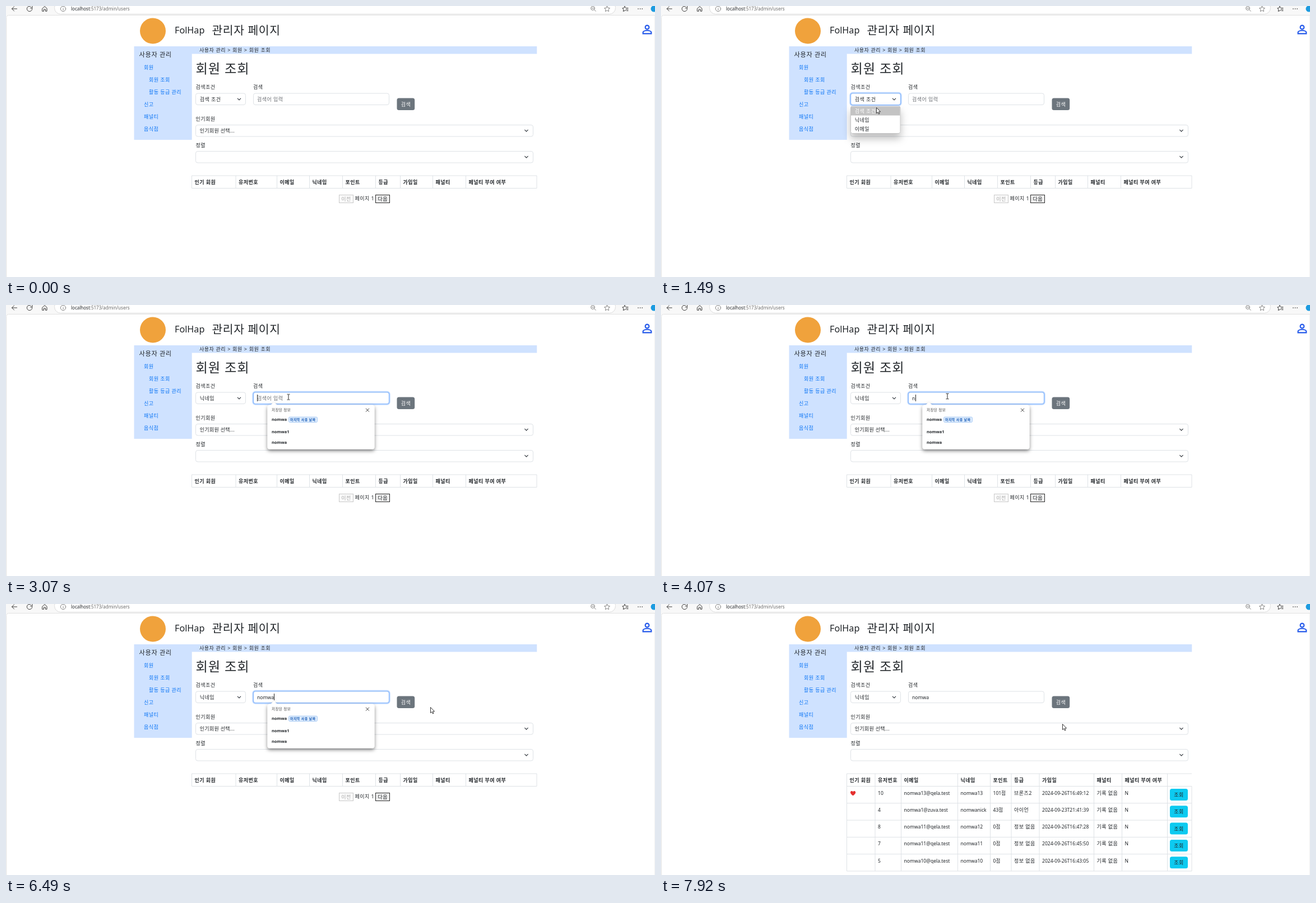
Recreate the animation shown at these times as an HTML page. Size 1158 px wide and 484 px high, loop 7.99 s.

```html
<!DOCTYPE html>
<html lang="ko">
<head>
<meta charset="utf-8">
<title>관리자 페이지</title>
<style>
html, body { margin: 0; width: 100%; height: 100%; overflow: hidden; background: #fff; }
svg { display: block; width: 1158px; height: 484px; }
text { font: 9px "Noto Sans", "Noto Sans CJK KR", "Noto Sans CJK JP", sans-serif; letter-spacing: .45px; fill: #212529; white-space: pre; }
.latin { font-size: 8.55px; letter-spacing: 0; }
.bold text, .bold { font-weight: 700; }
.links text { fill: #0a74f5; }
.url { font-size: 8px; letter-spacing: 0; }
.icon { fill: none; stroke: #3b3b3b; stroke-width: 1; stroke-linecap: round; stroke-linejoin: round; }
.field { fill: #fff; stroke: #dee2e6; }
.chev { fill: none; stroke: #343a40; stroke-width: 1.2; stroke-linecap: round; stroke-linejoin: round; }
.grid { fill: none; stroke: #dee2e6; }
.focus rect { fill: none; stroke: #86b7fe; stroke-width: 1.2; }
.focus .halo { stroke: #bcd7fe; stroke-width: 2; }
.hint { font-size: 6.6px; letter-spacing: .35px; fill: #4a4a4a; }
.badge { font-size: 6px; letter-spacing: .4px; font-weight: 700; fill: #1c5fb8; }
.saved { font-size: 7.3px; letter-spacing: 0; font-weight: 700; }
.pointer { fill: #fff; stroke: #222; stroke-width: .9; stroke-linejoin: round; }

.a { animation: 7990ms step-end infinite; }
#pointer { animation-name: move; }
#arrow { animation-name: arrow; }
#beam { animation-name: beam; }
#hand { animation-name: hand; }
#selFocus { animation-name: selFocus; }
#menu { animation-name: menu; }
#mark { animation-name: mark; }
#opt1 { animation-name: opt1; }
#opt2 { animation-name: opt2; }
#before { animation-name: before; }
#after { animation-name: after; }
#inFocus { animation-name: inFocus; }
#popup { animation-name: popup; }
#prompt { animation-name: prompt; }
#typed { animation-name: type; }
#caret { animation-name: caret; }
#blink { animation-name: blink; }
#btn { animation-name: btn; }
#empty { animation-name: empty; }
#result { animation-name: result; }

@keyframes move {
  0% { transform: translate(1065px, 500px); }
  1.6% { transform: translate(1065px, 471px); animation-timing-function: steps(3); }
  4.2% { transform: translate(790px, 365px); animation-timing-function: steps(3); }
  6.7% { transform: translate(540px, 255px); animation-timing-function: steps(4); }
  10.2% { transform: translate(349px, 165px); }
  11.85% { transform: translate(352px, 164px); animation-timing-function: steps(3); }
  14.5% { transform: translate(360px, 161px); }
  17% { transform: translate(366px, 164px); animation-timing-function: steps(2); }
  18.6% { transform: translate(384px, 181px); animation-timing-function: steps(4); }
  22.1% { transform: translate(380px, 203px); }
  24% { transform: translate(380px, 204px); animation-timing-function: steps(4); }
  28.7% { transform: translate(377px, 210px); }
  31.4% { transform: translate(383px, 208px); animation-timing-function: steps(7); }
  36.9% { transform: translate(490px, 167px); animation-timing-function: steps(3); }
  39.2% { transform: translate(511px, 163px); }
  71.7% { transform: translate(568px, 161px); animation-timing-function: steps(2); }
  73.4% { transform: translate(670px, 159px); animation-timing-function: steps(2); }
  75.2% { transform: translate(735px, 124px); animation-timing-function: steps(3); }
  77.8% { transform: translate(760px, 184px); }
  81.2% { transform: translate(757px, 184px); animation-timing-function: steps(4); }
  84.7% { transform: translate(725px, 181px); animation-timing-function: steps(4); }
  88.1% { transform: translate(720px, 185px); }
  92.2% { transform: translate(719px, 186px); }
  94% { transform: translate(720px, 187px); }
  96.4% { transform: translate(720px, 191px); animation-timing-function: steps(3); }
  99.1%, 100% { transform: translate(716px, 214px); }
}
@keyframes arrow { 0% { opacity: 1 } 35.7% { opacity: 0 } 74.5% { opacity: 1 } 84.7% { opacity: 0 } 97.3%, 100% { opacity: 1 } }
@keyframes beam { 0% { opacity: 0 } 35.7% { opacity: 1 } 74.5%, 100% { opacity: 0 } }
@keyframes hand { 0% { opacity: 0 } 84.7% { opacity: 1 } 97.3%, 100% { opacity: 0 } }
@keyframes selFocus { 0% { opacity: 0 } 17% { opacity: 1 } 36.9%, 100% { opacity: 0 } }
@keyframes menu { 0% { opacity: 0 } 17% { opacity: 1 } 24%, 100% { opacity: 0 } }
@keyframes mark { 0% { transform: none } 20.3%, 100% { transform: translateY(15.8px) } }
@keyframes opt1 { 0% { fill: #fff } 20.3%, 100% { fill: #212529 } }
@keyframes opt2 { 0% { fill: #212529 } 20.3%, 100% { fill: #fff } }
@keyframes before { 0% { opacity: 1 } 24%, 100% { opacity: 0 } }
@keyframes after { 0% { opacity: 0 } 24%, 100% { opacity: 1 } }
@keyframes inFocus { 0% { opacity: 0 } 36.9% { opacity: 1 } 82%, 100% { opacity: 0 } }
@keyframes popup { 0% { opacity: 0 } 37.8% { opacity: 1 } 82%, 100% { opacity: 0 } }
@keyframes prompt { 0% { opacity: 1 } 50.9%, 100% { opacity: 0 } }
@keyframes type {
  0% { width: 0 } 50.9% { width: 5.4px } 51.8% { width: 10.5px }
  56.8% { width: 18.4px } 58.4% { width: 25.2px } 62.5%, 100% { width: 40px }
}
@keyframes caret {
  0% { transform: none } 50.9% { transform: translateX(5.5px) } 51.8% { transform: translateX(10.5px) }
  56.8% { transform: translateX(18.5px) } 58.4% { transform: translateX(25.3px) } 62.5%, 100% { transform: translateX(30px) }
}
@keyframes blink { 0% { opacity: 0 } 36.9% { opacity: 1 } 44.3% { opacity: 0 } 50.9% { opacity: 1 } 69.2% { opacity: 0 } 75.5% { opacity: 1 } 82%, 100% { opacity: 0 } }
@keyframes btn { 0% { fill: #6c757d } 84.7% { fill: #5c636a } 97.3%, 100% { fill: #6c757d } }
@keyframes empty { 0% { opacity: 1 } 92.2%, 100% { opacity: 0 } }
@keyframes result { 0% { opacity: 0 } 92.2%, 100% { opacity: 1 } }
</style>
</head>
<body>
<svg viewBox="0 0 1158 484">
  <defs>
    <path id="chev" class="chev" d="M-2.7-1.4 0 1.4 2.7-1.4"/>
    <clipPath id="typedClip"><rect id="typed" class="a" x="448" y="156" width="0" height="20"/></clipPath>
    <filter id="deep" x="-40%" y="-40%" width="180%" height="210%"><feDropShadow dx="0" dy="9" stdDeviation="7" flood-opacity=".25"/></filter>
    <filter id="soft" x="-10%" y="-20%" width="120%" height="140%"><feDropShadow dx="0" dy="3" stdDeviation="3" flood-opacity=".5"/></filter>
  </defs>

  <!-- browser bar -->
  <rect width="1158" height="17" fill="#f8f8f8"/>
  <rect x="86.5" y="-8.5" width="1001" height="23" rx="11" fill="#fff" stroke="#dcdcdc"/>
  <path d="M.5 484V20.5Q.5 16.5 4.5 16.5H1158V484" fill="#fff" stroke="#e2e2e2"/>
  <g class="icon">
    <path d="M10.5 5H19.5M14.5 1 10.5 5 14.5 9"/>
    <path d="M46.5 3.5A4.7 4.7 0 1 1 44 .7M46.8 0V3.5H43.3"/>
    <path d="M65 4.3 69 .8 73 4.3V9.3H70.5V6H67.5V9.3H65Z"/>
    <g stroke="#777" stroke-width=".9"><circle cx="102" cy="5" r="4.6"/><path d="M102 4.7V7.4M102 2.8V2.9"/>
      <circle cx="1047" cy="4" r="3.4"/><path d="M1049.5 6.5 1052.3 9.3M1045.4 4H1048.6"/>
      <path d="M1072.5.2 1074 3.4 1077.5 3.8 1074.9 6.2 1075.6 9.7 1072.5 8 1069.4 9.7 1070.1 6.2 1067.5 3.8 1071 3.4Z"/></g>
    <path d="M1106 7.5 1101.3 9.5 1102 6.2 1099.7 4 1102.7 3.5 1104 .5 1105.4 3.3M1106.5 3.7H1110M1106.5 6H1110M1107.5 8.4H1110"/>
    <path stroke-width="1.7" d="M1128 5h.01M1131.6 5h.01M1135.2 5h.01"/>
  </g>
  <circle cx="1156" cy="5" r="5.5" fill="#1c9be0"/>
  <text class="url" x="116" y="8">localhost<tspan fill="#6a6a6a">:5173/admin/users</tspan></text>

  <!-- header -->
  <circle cx="262" cy="44.5" r="23" fill="#f0a23c"/>
  <text x="301" y="49.3" style="font-size:16.2px;letter-spacing:0">FolHap</text>
  <text x="367.5" y="50.7" style="font-size:20.4px;letter-spacing:.6px;font-weight:300">관리자 페이지</text>
  <g fill="none" stroke="#2459ea" stroke-width="2.1"><circle cx="1144" cy="38" r="3.4"/><path d="M1136.6 49.4V47.4C1136.6 44.8 1141 43.8 1144 43.8S1151.4 44.8 1151.4 47.4V49.4Z"/></g>

  <!-- sidebar and breadcrumb -->
  <path d="M228.5 72H947.3V85.6H331.7V239H228.5Z" fill="#cfe2ff"/>
  <text x="237.5" y="91.3" style="font-size:11.2px;letter-spacing:.65px">사용자 관리</text>
  <g class="links">
    <text x="246" y="113.3">회원</text>
    <text x="255" y="135.3">회원 조회</text>
    <text x="255" y="157.3">활동 등급 관리</text>
    <text x="246" y="179.3">신고</text>
    <text x="246" y="201.3">패널티</text>
    <text x="246" y="223.3">음식점</text>
  </g>
  <text x="345" y="82.3" style="word-spacing:.5px">사용자 관리 &gt; 회원 &gt; 회원 조회</text>
  <text x="338.5" y="120.3" style="font-size:23.2px;letter-spacing:.9px;font-weight:300">회원 조회</text>

  <!-- search form -->
  <text x="338.5" y="148.3">검색조건</text>
  <text x="441" y="148.3">검색</text>
  <text x="338.5" y="204.8">인기회원</text>
  <text x="338.5" y="252.3">정렬</text>
  <g class="field">
    <rect x="338.5" y="156" width="89" height="20.5" rx="3.5"/>
    <rect x="441.5" y="156" width="242" height="20.5" rx="3.5"/>
    <rect x="338.5" y="212.5" width="602" height="20.5" rx="3.5"/>
    <rect x="338.5" y="259.5" width="602" height="20.5" rx="3.5"/>
  </g>
  <use href="#chev" x="416" y="166.5"/>
  <use href="#chev" x="928.5" y="222.7"/>
  <use href="#chev" x="928.5" y="269.7"/>
  <text x="345.7" y="226" style="letter-spacing:.3px">인기회원 선택...</text>
  <text id="before" class="a" x="345.7" y="169.8">검색 조건</text>
  <text id="after" class="a" x="345.7" y="169.8" opacity="0">닉네임</text>
  <text id="prompt" class="a" x="448" y="169.8" style="fill:#6b6f74">검색어 입력</text>
  <rect id="btn" class="a" x="697.5" y="164.5" width="31.7" height="21.5" rx="3.5" fill="#6c757d"/>
  <text x="704.7" y="178.7" style="fill:#fff">검색</text>

  <!-- tables -->
  <g id="empty" class="a">
    <g class="bold" id="emptyHead"></g>
    <rect x="594.5" y="337.5" width="25" height="14" fill="#fafafa" stroke="#c9c9c9"/>
    <text x="598.3" y="348" style="fill:#ababab">이전</text>
    <text x="622.5" y="347.3">페이지 1</text>
    <rect x="659.5" y="337.5" width="25" height="14" fill="#efefef" stroke="#2a2a2a"/>
    <text x="663.5" y="348">다음</text>
  </g>
  <g id="result" class="a" opacity="0"></g>

  <!-- focus, menu, suggestions -->
  <g id="selFocus" class="a focus" opacity="0">
    <rect class="halo" x="337.3" y="154.8" width="91.4" height="22.9" rx="4.7"/>
    <rect x="338.5" y="156" width="89" height="20.5" rx="3.5"/>
  </g>
  <g id="menu" class="a" opacity="0">
    <rect x="338.5" y="179" width="88.5" height="48.5" rx="3" fill="#fff" stroke="#c4c4c4" filter="url(#deep)"/>
    <rect id="mark" class="a" x="339" y="179.7" width="87.5" height="15.8" fill="#c3c3c3"/>
    <text id="opt1" class="a" x="345.7" y="191">검색 조건</text>
    <text id="opt2" class="a" x="345.7" y="206.8">닉네임</text>
    <text x="345.7" y="222.6">이메일</text>
  </g>
  <g id="inFocus" class="a focus" opacity="0">
    <rect class="halo" x="440.3" y="154.8" width="244.4" height="22.9" rx="4.7"/>
    <rect x="441.5" y="156" width="242" height="20.5" rx="3.5"/>
  </g>
  <text class="latin" x="448" y="169.8" clip-path="url(#typedClip)">nomwa</text>
  <g id="blink" class="a" opacity="0"><path id="caret" class="a" d="M448.5 160V172" stroke="#222"/></g>
  <g id="popup" class="a" opacity="0">
    <path d="M471 178.5H472L478 174 484 178.5H653Q657.5 178.5 657.5 183V253Q657.5 257.5 653 257.5H471Q466.5 257.5 466.5 253V183Q466.5 178.5 471 178.5Z" fill="#fff" filter="url(#soft)"/>
    <text class="hint" x="474" y="190.4">저장된 정보</text>
    <path class="icon" d="M642.3 185 647.7 190.4M647.7 185 642.3 190.4"/>
    <text class="saved" x="474" y="207.3">nomwa</text>
    <rect x="504.5" y="200" width="51" height="9.5" rx="2" fill="#dcebfd" stroke="#9cc3f2" stroke-width=".8"/>
    <text class="badge" x="507" y="207">마지막 사용 날짜</text>
    <text class="saved" x="474" y="228.7">nomwa1</text>
    <text class="saved" x="474" y="248.2">nomwa</text>
  </g>

  <!-- pointer -->
  <g id="pointer" class="a">
    <path id="arrow" class="a pointer" d="M.5.5V10.6L2.8 8.5 4.4 12 6 11.3 4.5 7.9H7.6Z"/>
    <path id="beam" class="a" opacity="0" d="M-2.5-4.8H-.7L0-4.3.7-4.8H2.5M0-4.3V4.3M-2.5 4.8H-.7L0 4.3.7 4.8H2.5" fill="none" stroke="#222"/>
    <path id="hand" class="a pointer" opacity="0" d="M-1.1 8.5V.8Q-1.1-.4 0-.4T1.1.8V4.6Q2.4 4.3 3.1 4.9 4 4.6 4.7 5.1 6.6 5.2 6.8 6.6V9.5L5.4 13.3H0L-3.8 8.6Q-4.3 7.4-3.1 7.2Z"/>
  </g>
</svg>
<script>
const NS = "http://www.w3.org/2000/svg";
const add = (parent, tag, attrs, label) => {
  const el = document.createElementNS(NS, tag);
  for (const key in attrs) el.setAttribute(key, attrs[key]);
  if (label) el.textContent = label;
  return parent.appendChild(el);
};
const byId = id => document.getElementById(id);
const TOP = 303, HEAD = 325.5, ROW = 30.3, LEFT = 331.5, RIGHT = 947;
const titles = ["인기 회원", "유저번호", "이메일", "닉네임", "포인트", "등급", "가입일", "패널티", "페널티 부여 여부"];

function drawHead(group, edges) {
  titles.forEach((title, i) => add(group, "text", { x: edges[i] + 5, y: 317.7, class: "bold" }, title));
}

const wide = [LEFT, 410, 483.5, 541.5, 600.5, 659.5, 703.5, 761.5, 820.5, RIGHT];
const head = byId("emptyHead");
add(head, "path", { class: "grid", d: `M${LEFT} ${TOP}H${RIGHT}M${LEFT} ${HEAD}H${RIGHT}` + wide.map(x => `M${x} ${TOP}V${HEAD}`).join("") });
drawHead(head, wide);

const edges = [LEFT, 382, 428.5, 529.5, 587.5, 625, 675, 772.5, 822.5, 903.5];
const rows = [
  ["10", "nomwa13@qela.test", "nomwa13", "101점", "브론즈2", "2024-09-26T16:49:12"],
  ["4", "nomwa1@zuva.test", "nomwanick", "43점", "아이언", "2024-09-23T21:41:39"],
  ["8", "nomwa11@qela.test", "nomwa12", "0점", "정보 없음", "2024-09-26T16:47:28"],
  ["7", "nomwa11@qela.test", "nomwa11", "0점", "정보 없음", "2024-09-26T16:45:50"],
  ["5", "nomwa10@qela.test", "nomwa10", "0점", "정보 없음", "2024-09-26T16:43:05"]
];
const result = byId("result");
const end = HEAD + ROW * rows.length;
let lines = `M${LEFT} ${TOP}H${RIGHT}M${RIGHT} ${HEAD}V${end}` + edges.map(x => `M${x} ${TOP}V${end}`).join("");
for (let i = 0; i <= rows.length; i++) lines += `M${LEFT} ${HEAD + i * ROW}H${RIGHT}`;
add(result, "path", { class: "grid", d: lines });
drawHead(result, edges);
rows.forEach((row, r) => {
  const y = HEAD + r * ROW;
  [...row, "기록 없음", "N"].forEach((cell, c) =>
    add(result, "text", { x: edges[c + 1] + 5, y: y + 15, class: /^[가-힣]/.test(cell) ? "" : "latin" }, cell));
  add(result, "rect", { x: 908, y: y + 4.5, width: 32, height: 21, rx: 3.5, fill: "#0dcaf0" });
  add(result, "text", { x: 915.3, y: y + 18.4 }, "조회");
});
add(result, "path", { fill: "#e5302f", d: "M342.6 342.3C339 339.6 337.9 338 338 336.2C338.2 333.6 341.4 333.2 342.6 335.5C343.8 333.2 347 333.6 347.2 336.2C347.3 338 346.2 339.6 342.6 342.3Z" });
</script>
</body>
</html>
```
